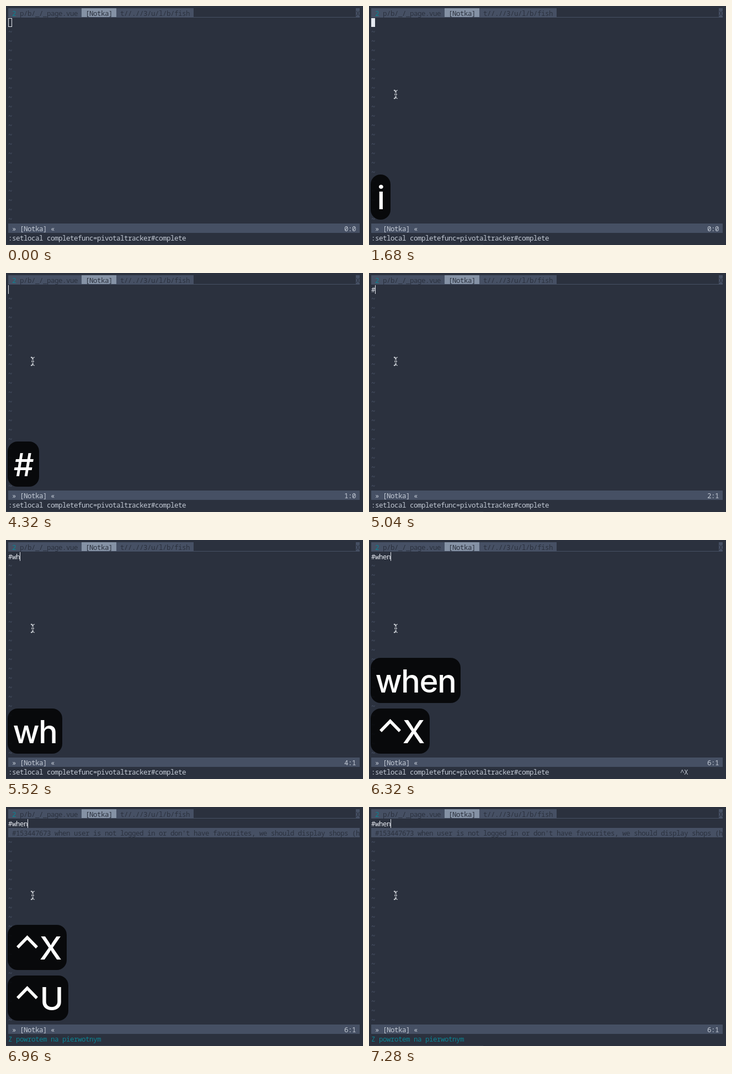
These frames come from a looping animation (647 px wide and 434 px high, 8 s). An HTML page with a canvas:

```html
<!DOCTYPE html>
<html lang="pl">
<head>
<meta charset="utf-8">
<style>
html, body { margin: 0; width: 100%; height: 100%; overflow: hidden; background: #2b313e; }
canvas { display: block; }
</style>
</head>
<body>
<canvas id="stage" width="647" height="434"></canvas>
<script>
const ctx = document.getElementById('stage').getContext('2d');
const LOOP = 8000, COL = 7, ROW = 17, COLS = 91, KEY_LIFE = 720;
const BG = '#2b313e', BAR = '#465064', FG = '#c3cad5', BRIGHT = '#e5e9f0', TEAL = '#0b8493';
const MONO = '500 12.5px "Noto Sans Mono", "DejaVu Sans Mono", monospace';
const SANS = '500 58px Inter, "Open Sans", sans-serif';

// Key badges: label, badge width, time shown, time of the last key in it
const keys = [
  ['i', 36, 1680, 1680],
  ['#', 57, 4320, 4320],
  ['w', 67, 5120, 5520],
  ['wh', 99, 5520, 5600],
  ['whe', 131, 5600, 5920],
  ['when', 163, 5920, 5920],
  ['^X', 107, 6320, 6320],
  ['^U', 110, 6560, 6560]
];
// Times at which each typed character reaches the buffer
const typed = [4400, 5200, 5520, 5680, 5920];

const x = col => 4 + col * COL;
const y = row => 4 + row * ROW;

function fill(color, left, top, w, h) {
  ctx.fillStyle = color;
  ctx.fillRect(left, top, w, h);
}

function text(str, col, row, color) {
  ctx.font = MONO;
  ctx.letterSpacing = '-0.5px';
  ctx.textAlign = 'left';
  ctx.fillStyle = color;
  ctx.fillText(str, x(col), y(row) + 14);
}

function line(points, color, width) {
  ctx.beginPath();
  points.forEach(([px, py]) => ctx.lineTo(px, py));
  ctx.strokeStyle = color;
  ctx.lineWidth = width;
  ctx.stroke();
}

function tabs() {
  fill(BAR, 4, 4, 336, 17);
  fill('#8592a5', x(19), 4, 9 * COL, 17);
  fill(BAR, 4, 20, COLS * COL, 1);
  fill(BAR, x(90), 4, COL, 17);
  text('2', 1, 0, TEAL);
  text('p/b/_/_page.vue', 3, 0, BG);
  text('[Notka]', 20, 0, BG);
  text('t//.//3/u/l/b/fish', 29, 0, BG);
  text('X', 90, 0, BG);
}

function cursor(t, col) {
  if (t < 800) {
    ctx.strokeStyle = BRIGHT;
    ctx.lineWidth = 1;
    ctx.strokeRect(4.5, 22.5, 6, 15);
  } else if (t < 1760) fill(BRIGHT, 4, 22, COL, 16);
  else fill(BRIGHT, x(col), 22, 1, 16);
}

function arrow(left, top) {
  ctx.save();
  ctx.translate(left, top);
  ctx.beginPath();
  [[.5, .5], [.5, 14], [3.6, 11.3], [6, 17], [8.5, 16], [6.2, 10.5], [10.8, 10.5]]
    .forEach(p => ctx.lineTo(...p));
  ctx.closePath();
  ctx.fillStyle = '#000';
  ctx.fill();
  ctx.strokeStyle = '#fff';
  ctx.lineWidth = 1;
  ctx.stroke();
  ctx.restore();
}

function beam() {
  const stem = [[45, 153], [47, 153.5], [48.5, 155.5], [48.5, 165.5], [47, 167.5], [45, 168]];
  line(stem, '#c9cdd3', 2);
  line([[52, 153], [50, 153.5], [48.5, 155.5]], '#c9cdd3', 1.2);
  line([[52, 168], [50, 167.5], [48.5, 165.5]], '#c9cdd3', 1.2);
  line([[46, 160.5], [51, 160.5]], '#c9cdd3', 1.5);
  line([[48.5, 157], [48.5, 164]], '#3a3f49', 1);
}

function badge([label, width], top) {
  ctx.fillStyle = 'rgba(0,0,0,.82)';
  ctx.beginPath();
  ctx.roundRect(3, top, width, 82, 18);
  ctx.fill();
  ctx.font = SANS;
  ctx.letterSpacing = '-1.5px';
  ctx.fillStyle = '#fff';
  if (label[0] === '^') {
    line([[21, top + 41], [38.5, top + 23], [56, top + 41]], '#fff', 5.5);
    ctx.textAlign = 'right';
    ctx.fillText(label[1], width - 7, top + 63);
  } else {
    ctx.textAlign = 'center';
    ctx.fillText(label, 3 + width / 2, top + 63);
  }
}

function draw(t) {
  const count = typed.filter(at => t >= at).length;
  fill(BG, 0, 0, 647, 434);
  fill('#39404d', 0, 433, 207, 1);
  tabs();
  for (let row = 2; row < 23; row++) text('~', 0, row, '#4c566a');
  text('#when'.slice(0, count), 0, 1, BRIGHT);
  cursor(t, count);

  fill(BAR, 4, y(23), COLS * COL, ROW);
  text('» [Notka] «', 1, 23, FG);
  text(t < 1760 ? '0:0' : `${count + 1}:${count ? 1 : 0}`, 87, 23, FG);

  if (t >= 6960) {
    fill(BAR, 4, y(2), COLS * COL, ROW);
    text("#153447673 when user is not logged in or don't have favourites, we should display shops (h", 1, 2, BG);
    text('Z powrotem na pierwotnym', 0, 24, TEAL);
  } else {
    text(':setlocal completefunc=pivotaltracker#complete', 0, 24, FG);
    if (t >= 6320 && t < 6640) text('^X', 80, 24, FG);
  }

  if (t >= 800) beam();
  else if (t >= 560) arrow(49, 159);
  else if (t >= 480) arrow(143, 264);

  // A growing word replaces its shorter form; finished badges stack upwards
  const shown = keys.filter(([label, , from, last], i) => {
    const next = keys[i + 1];
    const grows = next && next[0].startsWith(label);
    return t >= from && t < (grows ? next[2] : last + KEY_LIFE);
  });
  shown.reverse().forEach((key, i) => badge(key, 306 - 92 * i));
}

const start = performance.now();
function tick() {
  draw((performance.now() - start) % LOOP);
  requestAnimationFrame(tick);
}
tick();
</script>
</body>
</html>
```
